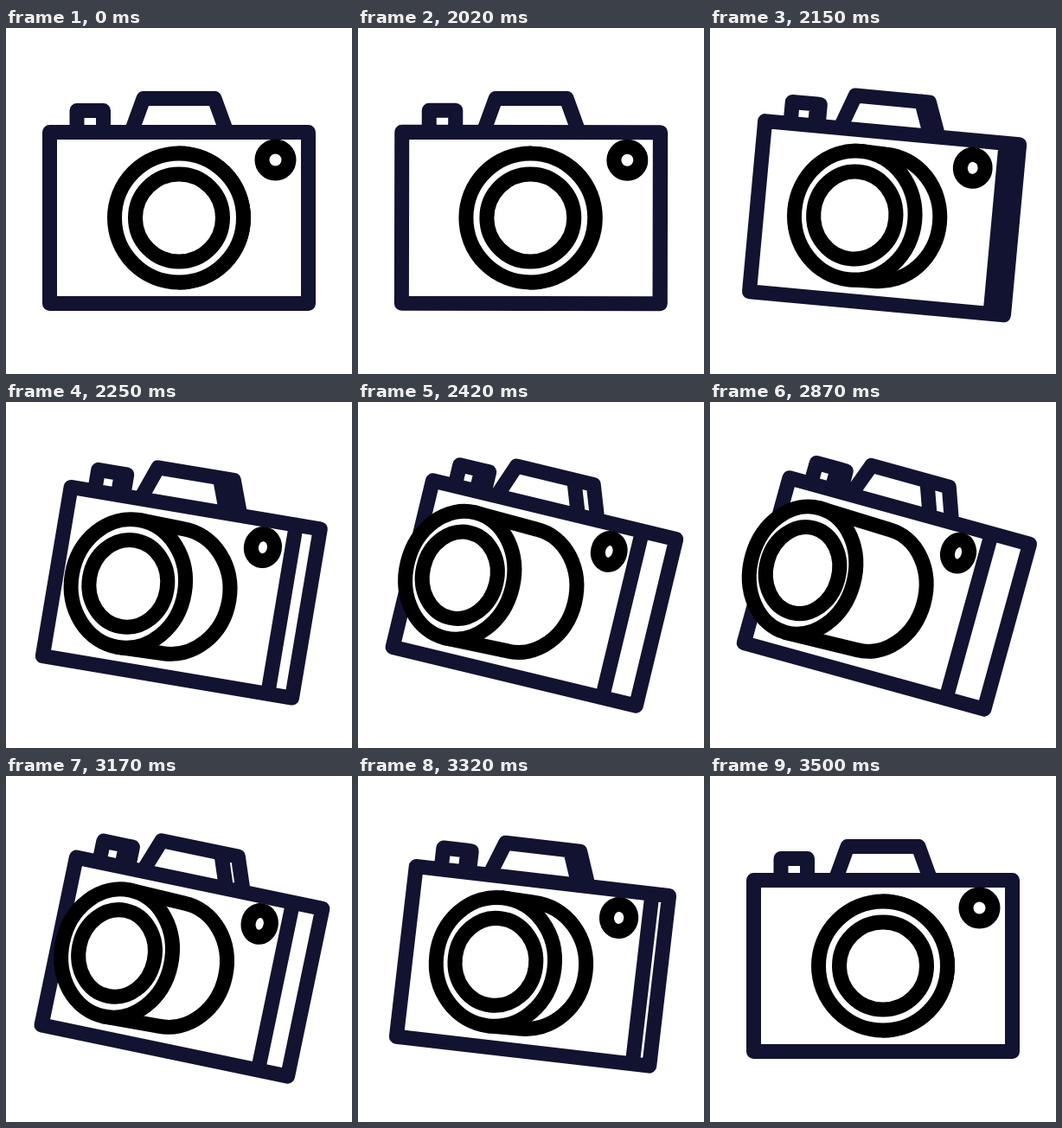
Write an HTML page that moves like this. It is 400 by 400 pixels and loops after 3520 ms.

```html
<!DOCTYPE html>
<html>
<head>
<meta charset="utf-8">
<style>
html, body { margin: 0; height: 100%; overflow: hidden; background: #fff; }
svg { display: block; width: 100vw; height: 100vh; }
</style>
</head>
<body>
<svg viewBox="0 0 400 400">
  <g id="camera" fill="none" stroke-width="17" stroke-linecap="round" stroke-linejoin="round">
    <path id="body" stroke="#121331"/>
    <g stroke="#000">
      <path id="barrel" fill="#fff"/>
      <ellipse id="rim" cy="219.5" ry="74.5" fill="#fff"/>
      <ellipse id="glass" cy="219.5" ry="50.5"/>
      <ellipse id="flash" cy="152.5" ry="15.5"/>
    </g>
  </g>
</svg>
<script>
const LOOP = 3520, START = 2000, TURN = 750;
const $ = id => document.getElementById(id);
const set = (id, attrs) => {
  for (const name in attrs) $(id).setAttribute(name, attrs[name]);
};

// cubic-bezier(.2, 0, .2, 1)
function ease(x) {
  let lo = 0, hi = 1;
  for (let i = 0; i < 24; i++) {
    const s = (lo + hi) / 2;
    if (0.6 * s * (1 - s) + s ** 3 < x) lo = s; else hi = s;
  }
  return lo * lo * (3 - 2 * lo);
}

function draw(t) {
  const phase = Math.max(0, 1 - Math.abs(t - START - TURN) / TURN);
  const turn = ease(phase) * 1.01;
  const mix = (a, b) => a + (b - a) * turn;

  const pressTime = (t - 2540) / 320;
  const press = pressTime > 0 && pressTime < 1 ? 9.5 * Math.sin(Math.PI * pressTime) ** 2 : 0;

  const left = mix(50.5, 66), right = mix(349.5, 354), edge = mix(349.5, 308);
  const hump = mix(159, 153.5), humpBack = mix(241, 246.5), humpEdge = mix(241, 220);
  const button = mix(82, 91.5), buttonBack = mix(112.5, 127), buttonEdge = mix(112.5, 116.5);

  set('camera', { transform: `rotate(${mix(0, 15.5)} 200 200)` });
  set('body', { d: `M${left} 120.5H${right}V318.5H${left}ZM${edge} 120.5V318.5
    M${hump - 14} 120L${hump} 81.5H${humpBack}l14 38.5M${humpEdge} 81.5l14 38.5
    M${button} 120V${95.5 + press}H${buttonEdge}M${buttonEdge} 120V95.5H${buttonBack}V120` });

  const front = mix(200, 108.5), base = mix(200, 193.5);
  const rx = mix(74.5, 60.5), baseRy = mix(74.5, 72);
  set('barrel', { d: `M${front} 145L${base} ${219.5 - baseRy}
    A${rx} ${baseRy} 0 0 1 ${base} ${219.5 + baseRy}L${front} 294` });
  set('rim', { cx: front, rx });
  set('glass', { cx: front, rx: mix(50.5, 42) });
  set('flash', { cx: mix(311.5, 277), rx: mix(15.5, 12.3) });
}

function frame() {
  draw(performance.now() % LOOP);
  requestAnimationFrame(frame);
}
frame();
</script>
</body>
</html>
```
